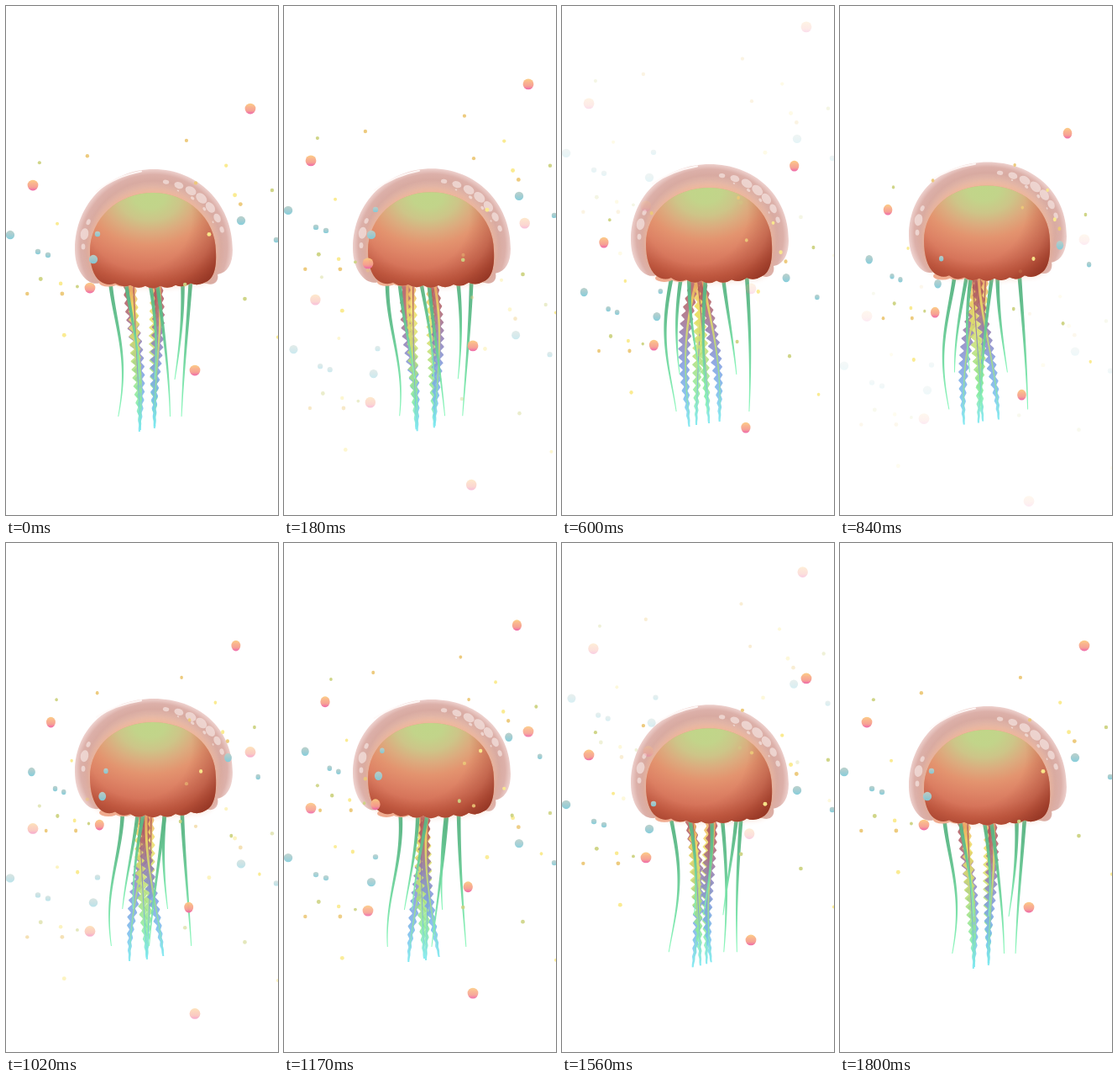
Recreate the animation shown at these times as an HTML page with a canvas. Size 324x605 px, loop 1830 ms.

```html
<!DOCTYPE html>
<html lang="en">
<head>
<meta charset="utf-8">
<title>Jellyfish</title>
<style>
html, body { margin: 0; width: 100%; height: 100%; overflow: hidden; background: #fff; }
canvas { display: block; width: 324px; height: 605px; }
</style>
</head>
<body>
<canvas id="stage" width="324" height="605"></canvas>
<script>
const ctx = document.getElementById('stage').getContext('2d');
const CYCLE = 1800, STEP = 30, LOOP = CYCLE + STEP;
const LIFE = 1740, RISE = 0.162, CENTER = 176;

const RED = ['#ad4b50', '#b0626a', '#8f7bb2', '#7d9be0', '#76b9ea', '#79e8f2'];
const YELLOW = ['#eb9a5c', '#f0df66', '#d6df6c', '#a8e07e', '#86ec9f', '#7ce8ef'];
const GREEN = ['#55b07f', '#60c08c', '#74dca3', '#88f8bb'];
const PINK = ['#fccb80', '#f9b089', '#f69d8f', '#ee5fa6'];
const BLUE = ['#b9cfc9', '#9fcbd0', '#7fccda'];
const SPECKS = ['#faea8c', '#ecc878', '#cdd382'];

const mix = (a, b, s) => a + (b - a) * s;
const clamp = x => Math.max(0, Math.min(1, x));
const ease = x => (1 - Math.cos(Math.PI * x)) / 2;
const arch = x => Math.sin(Math.PI * clamp(x));
const triangle = x => 1 - Math.abs(2 * (x - Math.floor(x)) - 1);

function seeded(seed) {
  return () => (seed = seed * 16807 % 2147483647) / 2147483647;
}

function shade(gradient, colors) {
  colors.forEach((c, i) => gradient.addColorStop(i / (colors.length - 1), c));
  return gradient;
}

// A strand's sway peaks at the root first and travels down to the tip.
const tendrils = [1050, 1200, 1480, 1300, 1750, 2100].map((peak, i) => {
  const x = 131 + 17 * i, amp = 8 + 6 * arch(i / 5);
  return { x: [x, x], amp: [amp, amp], peak, lag: 450 + 650 * Math.exp(-2 * i), length: 2 * i % 5 < 2 ? 154 : 110 };
});
const ribbons = [980, 900, 1750, 1700].map((peak, i) => {
  const red = i % 3 === 0;
  return {
    x: [157 + 5 * i, 153 + 10 * i], amp: [12 - i, 6], peak, lag: red ? 900 : 300, length: 172 - 2 * i,
    body: red ? 4 : 2.4, colors: red ? RED : YELLOW, trim: red ? YELLOW : RED, trimWidth: red ? 3.4 : 1.6
  };
});

const bubble = (colors, r) => ([x, y]) => ({ x, y, r, colors });
const random = seeded(7);
const bubbles = [
  ...[[291,122], [32,213], [225,433], [100,335]].map(bubble(PINK, 6.4)),
  ...[[5,272], [280,255], [104,301]].map(bubble(BLUE, 5.2)),
  ...[[38,292], [50,296], [322,278], [109,271]].map(bubble(BLUE, 3.2)),
  ...Array.from({ length: 19 }, (_, i) => {
    const x = i % 2 ? 120 * random() : 324 - 120 * random();
    return { x, y: 145 + 270 * random(), r: 1.9 + .6 * random(), colors: Array(2).fill(SPECKS[i % 3]) };
  })
];

let lift = 0;   // 0 = relaxed and low, 1 = flattened and high
const rise = (y, top, span, squash) => y - lift * (9 + squash * arch((y - top) / span));
const hoodY = y => rise(y, 194, 165, 9);
const bodyY = y => rise(y, 224, 113, 5);

function strandX({ x, amp, peak, lag }, s, t) {
  return mix(...x, s) + mix(...amp, s) * Math.cos(2 * Math.PI * (t - peak - lag * s) / CYCLE);
}

// width(s, side) is the extent on the left (-1) or right (1) at fraction s
function fillStrand(strand, t, colors, width) {
  const top = 326 - 9 * lift, length = strand.length + 8;
  ctx.beginPath();
  for (const side of [-1, 1]) {
    for (let i = 0; i <= length; i++) {
      const s = side < 0 ? i / length : 1 - i / length;
      ctx.lineTo(strandX(strand, s, t) + side * width(s, side), top + length * s);
    }
  }
  ctx.fillStyle = shade(ctx.createLinearGradient(0, top, 0, top + length), colors);
  ctx.fill();
}

function drawStrands(t) {
  ctx.globalAlpha = .85;
  for (const r of ribbons) {
    fillStrand(r, t, r.colors, (s, side) =>
      mix(r.body, 1, s) + (side < 0 ? 6 : 4.5) * arch(s * .9 + .1) * triangle(s * 18 + side / 4));
    fillStrand(r, t, r.trim, (s, side) => side < 0 ? 0 : mix(r.trimWidth, .6, s));
  }
  ctx.globalAlpha = .95;
  for (const g of tendrils) fillStrand(g, t, GREEN, s => mix(2.4, .5, s));
  ctx.globalAlpha = 1;
}

function tracePath(y, start, curves) {
  ctx.beginPath();
  ctx.moveTo(start[0], y(start[1]));
  for (const c of curves) {
    const p = c.map((v, i) => i % 2 ? y(v) : v);
    if (p.length > 4) ctx.bezierCurveTo(...p);
    else ctx.quadraticCurveTo(...p);
  }
  ctx.closePath();
}

function ellipse(x, y, rx, ry, angle = 0) {
  ctx.beginPath();
  ctx.ellipse(x, y, rx, ry, angle, 0, 7);
  ctx.fill();
}

function drawHood() {
  const mid = hoodY(286), height = mid - hoodY(194);
  tracePath(hoodY, [82, 290], [
    [82,234, 124,194, 176,194], [228,194, 270,234, 270,290],
    [270,306, 264,317, 252,319], [254,327, 248,333, 239,330],
    [176,322, 112,329], [98,334, 82,316, 82,290]
  ]);
  ctx.save();
  ctx.clip();
  ctx.translate(CENTER, mid);
  ctx.scale(1, height / 94);
  ctx.fillStyle = shade(ctx.createRadialGradient(0, 0, 65, 0, 0, 95),
    ['#ecc2ad', '#e0b5a8', '#d8aaa1', '#dcb0a9', '#f0d5d2']);
  ctx.fillRect(-110, -110, 220, 190);
  ctx.restore();

  // frill peeping out below
  ctx.fillStyle = '#f0aa8e';
  for (let x = 122; x < 165; x += 18) ellipse(x, 329 - 8.5 * lift, 11, 4.5);
}

function drawBody() {
  const scallops = Array.from({ length: 7 }, (_, i) => {
    const edge = f => 327 + 6 * arch(f);
    const x = f => mix(238, 112, f);
    return [x((i + .5) / 7), edge((i + .5) / 7) + 5, x((i + 1) / 7), edge((i + 1) / 7)];
  });
  tracePath(bodyY, [100, 292], [
    [100,252, 134,222, 175,222], [216,222, 250,252, 250,292],
    [251,310, 248,324, 238,328], ...scallops, [104,321, 100,308, 100,292]
  ]);
  ctx.save();
  ctx.shadowColor = 'rgba(238,176,146,.95)';
  ctx.shadowBlur = 10;
  ctx.shadowOffsetY = -3;
  ctx.fillStyle = '#e0a680';
  ctx.fill();
  ctx.restore();

  ctx.save();
  ctx.clip();
  ctx.translate(171, bodyY(226));
  ctx.scale(1.3, 1);
  ctx.fillStyle = shade(ctx.createRadialGradient(0, 0, 0, 0, 0, 116),
    ['#c0d689', '#c2d48a', '#cdc588', '#dcab7e', '#e3946f', '#de8466', '#d6745a', '#c95f45', '#b85039']);
  ctx.fillRect(-80, -20, 160, 150);
  ctx.scale(1 / 1.3, 1);
  ctx.fillStyle = shade(ctx.createRadialGradient(-12, 25, 62, -12, 25, 116),
    ['rgba(130,40,25,0)', 'rgba(130,40,25,.25)', 'rgba(130,40,25,.75)']);
  ctx.fillRect(-90, -20, 180, 150);
  ctx.restore();
}

// Pale spots along the rim; angles in degrees from the crown
function drawSpots(from, to, count, size, radius = 1) {
  for (let i = 0; i < count; i++) {
    const f = i / (count - 1), a = mix(from, to, f) * Math.PI / 180;
    const r = size * (.5 + .5 * arch(f));
    ellipse(CENTER + 84 * radius * Math.sin(a), hoodY(286 - 78 * radius * Math.cos(a)), r, r * .68, a);
  }
}

function drawHighlights() {
  ctx.fillStyle = 'rgba(248,232,229,.65)';
  drawSpots(10, 75, 7, 7.5);
  drawSpots(22, 66, 4, 2.6, .92);
  drawSpots(-68, -90, 3, 7);
  ctx.beginPath();
  ctx.moveTo(108, hoodY(220));
  ctx.quadraticCurveTo(130, hoodY(202.5), 161, hoodY(196.5));
  ctx.strokeStyle = 'rgba(255,250,249,.9)';
  ctx.lineWidth = 2.2;
  ctx.lineCap = 'round';
  ctx.stroke();
}

function drawBubbles(age, squeeze) {
  if (age > LIFE) return;
  ctx.save();
  ctx.globalAlpha = .95 * clamp(age / 420) * clamp((LIFE - age) / 540);
  ctx.translate(CENTER, 165.3 - RISE * age);
  ctx.scale(squeeze, 1);
  for (const { x, y, r, colors } of bubbles) {
    ctx.fillStyle = shade(ctx.createLinearGradient(0, y - r, 0, y + r), colors);
    ellipse(x - CENTER, y, r, r);
  }
  ctx.restore();
}

function draw(now) {
  const t = Math.floor(now % LOOP / STEP) * STEP % CYCLE;
  lift = ease(t < 1000 ? t / 1000 : (CYCLE - t) / 800);
  ctx.fillStyle = '#fff';
  ctx.fillRect(0, 0, 324, 605);
  drawStrands(t);
  drawHood();
  drawBody();
  drawHighlights();
  // two overlapping swarms; the second narrows and widens as it climbs
  drawBubbles((t + 1020) % CYCLE, 1);
  drawBubbles(t, mix(.82, 1, Math.abs(2 * t / LIFE - 1)));
}

let start;
function tick(now) {
  start ??= now;
  draw(now - start);
  requestAnimationFrame(tick);
}
requestAnimationFrame(tick);
</script>
</body>
</html>
```
